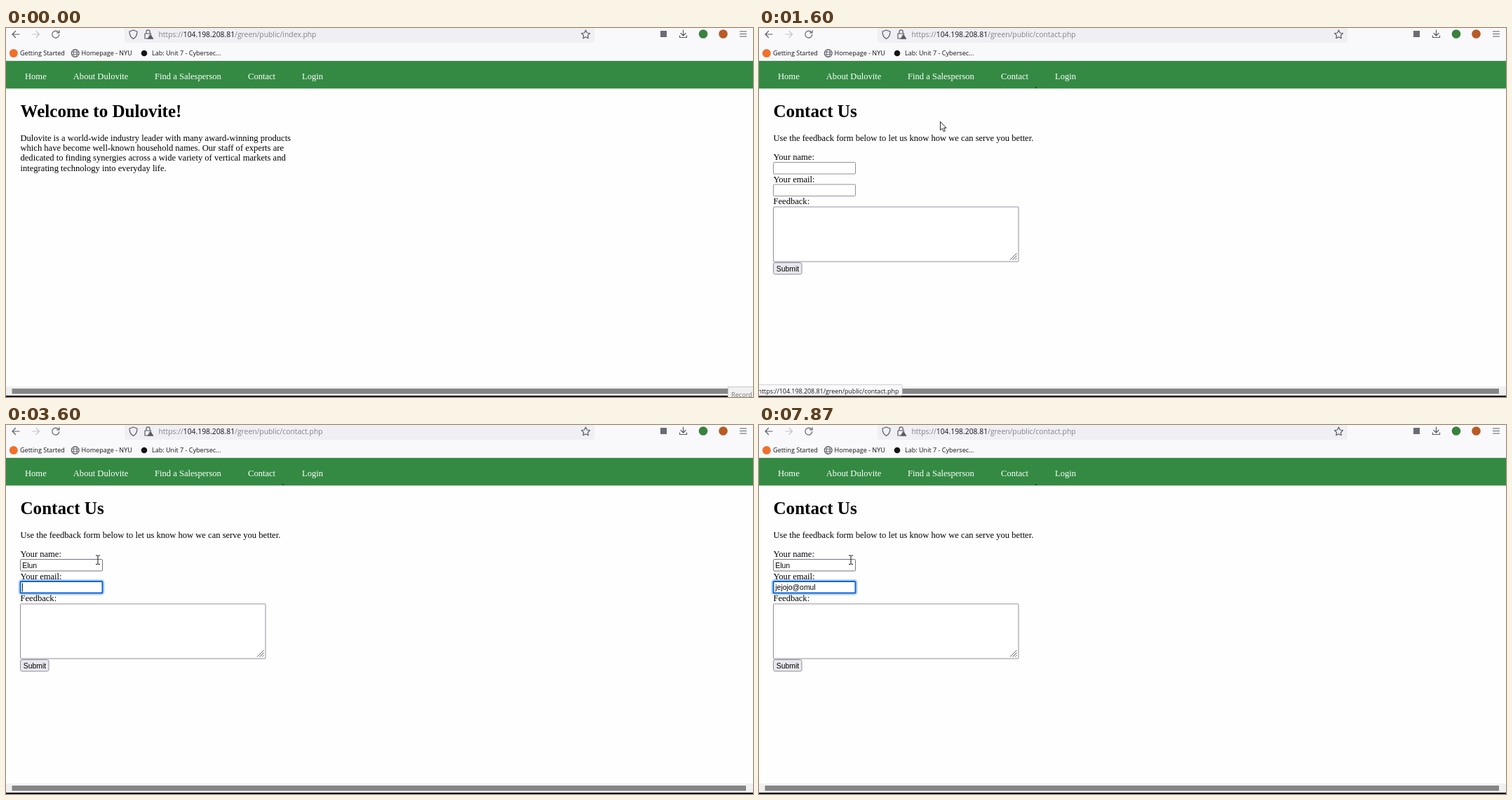
Recreate the animation shown at these times as an HTML page. Size 1065 px wide and 526 px high, loop 8000 ms.

```html
<!DOCTYPE html>
<html lang="en">
<head>
<meta charset="utf-8">
<title>Contact form</title>
<style>
html, body { margin: 0; width: 100%; height: 100%; overflow: hidden; background: #fff; }
svg { display: block; width: 1065px; height: 526px; }
text { white-space: pre; }
.ui { font-family: "Open Sans", "Noto Sans", sans-serif; fill: #15141a; }
.url { font-size: 10.35px; fill: #82828b; }
.url .host { fill: #15141a; }
.small { font-size: 9.05px; }
.page { font: 12.57px "Liberation Serif", serif; }
.page .title { font-size: 25.1px; font-weight: bold; }
.nav { fill: #fff; }
.field { font: 10.4px "Liberation Sans", sans-serif; }
.icon { fill: none; stroke: #5b5b66; stroke-width: 1.2; stroke-linecap: round; stroke-linejoin: round; }
.box { fill: #fff; stroke: #8f8f9d; }
</style>
</head>
<body>
<svg viewBox="0 0 1065 526">
  <rect width="1065" height="526" fill="#fefefe"/>
  <rect width="1065" height="47" fill="#f9f9fb"/>
  <rect y="46" width="1065" height="1" fill="#e6e6ea"/>
  <rect x="169" y="-6" width="670" height="27" rx="4" fill="#f0f0f4"/>

  <g class="icon">
    <path d="M19 9H9M13.5 4.5L9 9L13.5 13.5"/>
    <path d="M37.500 9H47.500M43 4.500L47.500 9L43 13.500" stroke="#c4c4ca"/>
    <path d="M74.600 5.800A5 5 0 1 0 75.800 9.500M76 3.500V7H72.500"/>
    <path d="M181.500 3L187 5C187 10.500 185 13.500 181.500 15.500C178 13.500 176 10.500 176 5Z"/>
    <path d="M202 15H198V8H207M200 8V5.500A2.600 2.600 0 0 1 205.200 5.500V8"/>
    <path d="M206 9L210 15.500H202Z" fill="#5b5b66" stroke-width=".7"/>
    <path d="M826.500 3L828.400 7L832.500 7.500L829.500 10.500L830.200 14.700L826.500 12.700L822.800 14.700L823.500 10.500L820.500 7.500L824.600 7Z"/>
    <path d="M965.500 3V10.500M962 7.500L965.500 11L969 7.500M960.500 11V13.500H970.500V11"/>
    <path d="M1046.500 5H1055.500M1046.500 8.500H1055.500M1046.500 12H1055.500"/>
    <circle cx="98.700" cy="36" r="5.400"/>
    <ellipse cx="98.700" cy="36" rx="2.500" ry="5.400" stroke-width=".9"/>
    <path d="M93.500 34.300H104M93.500 37.700H104" stroke-width=".9"/>
  </g>
  <rect x="933" y="4" width="9" height="9" fill="#6b6b75"/>
  <circle cx="994" cy="8.500" r="6.300" fill="#39813d"/>
  <circle cx="1022.500" cy="8.500" r="6.300" fill="#b85b25"/>
  <circle cx="10.800" cy="36" r="6" fill="#f0702c"/>
  <circle cx="197" cy="36" r="4.300" fill="#151515"/>

  <text class="ui url" x="217.500" y="13.300">https://<tspan class="host">104.198.208.81</tspan><tspan id="path"></tspan></text>
  <g class="ui small">
    <text x="20" y="39.200">Getting Started</text>
    <text x="107.500" y="39.200">Homepage - NYU</text>
    <text x="208" y="39.200">Lab: Unit 7 - Cybersec...</text>
  </g>

  <rect y="47" width="1065" height="39" fill="#348a43"/>
  <rect y="86" width="1065" height=".6" fill="#9bc4a2"/>
  <g class="page nav">
    <text x="27" y="72.500">Home</text>
    <text x="95.800" y="72.500">About Dulovite</text>
    <text x="212" y="72.500">Find a Salesperson</text>
    <text x="345" y="72.500">Contact</text>
    <text x="422" y="72.500">Login</text>
  </g>
  <path id="speck" d="M393.500 84.500H395V85.500H396.500" fill="none" stroke="#1d3b22"/>

  <g id="home" class="page">
    <text class="title" x="20.500" y="127">Welcome to Dulovite!</text>
    <text x="20.500" y="161">Dulovite is a world-wide industry leader with many award-winning products</text>
    <text x="20.500" y="175.200">which have become well-known household names. Our staff of experts are</text>
    <text x="20.500" y="189.400">dedicated to finding synergies across a wide variety of vertical markets and</text>
    <text x="20.500" y="203.600">integrating technology into everyday life.</text>
  </g>

  <g id="contact">
    <g class="page">
      <text class="title" x="20.500" y="127">Contact Us</text>
      <text x="20.500" y="161">Use the feedback form below to let us know how we can serve you better.</text>
      <text x="20.500" y="188">Your name:</text>
      <text x="20.500" y="219.500">Your email:</text>
      <text x="20.500" y="251">Feedback:</text>
    </g>
    <rect id="nameBox" class="box" x="20.500" y="191.500" width="117" height="16.500" rx="1"/>
    <rect class="box" x="20.500" y="223" width="117" height="16.500" rx="1"/>
    <rect class="box" x="20.500" y="255" width="349.500" height="78" rx="1"/>
    <path d="M358 330.500L367.500 321M361.500 330.500L367.500 324.500M365 330.500L367.500 328" stroke="#55555c" fill="none"/>
    <rect x="20.500" y="334.500" width="40.500" height="16.500" rx="2.500" fill="#e9e9ed" stroke="#8f8f9d"/>
    <text class="field" x="24.800" y="347">Submit</text>
    <g id="ring" fill="none">
      <rect x="18.500" y="189.500" width="121" height="20.500" rx="3.500" stroke="#b5d3f8" stroke-width="2"/>
      <rect x="20.500" y="191.500" width="117" height="16.500" rx="1.500" fill="#fff" stroke="#0a62d4" stroke-width="2"/>
    </g>
    <text id="nameText" class="field" x="23.300" y="203.700"></text>
    <text id="mailText" class="field" x="23.300" y="235.200"></text>
    <rect id="caret" width="1" height="12" fill="#111"/>
    <g id="hint">
      <rect x="20.500" y="209.500" width="117" height="15" fill="#fff" stroke="#cfcfd8"/>
      <text class="ui small" x="24" y="220.300">Elun</text>
    </g>
  </g>

  <rect y="511" width="1065" height="13" fill="#f0f0f0"/>
  <rect x="8.500" y="514" width="1046.500" height="7.500" fill="#858585"/>
  <rect y="524" width="1065" height="2" fill="#17181b"/>
  <g id="status">
    <rect x="-2" y="508.500" width="206" height="15.500" rx="1" fill="#f9f9fb" stroke="#d0d0d6"/>
    <text class="ui" x="-1.500" y="520.500" font-size="8.900">https://104.198.208.81/green/public/contact.php</text>
  </g>
  <g id="tip">
    <rect x="1029.500" y="511.500" width="40" height="18" fill="#f1f1f1" stroke="#c8c8c8"/>
    <text class="ui" x="1034" y="525.800" font-size="9.200" style="fill:#777">Record</text>
  </g>

  <path id="arrow" d="M.5 .5V12.700L3.300 10.200L5.300 14.700L7.300 13.800L5.400 9.500H9Z" fill="#fff" stroke="#111" stroke-width=".9"/>
  <path id="hand" d="M4.500 1.500Q6 0 7 1.700V7L8 6.500L9.500 7.200L10.700 7L12 8L13.500 8.500V13L12 16V18.500H5V16.500L1 11.500Q.5 9.500 2.500 10L4.300 11.800V1.500M7 7V10M9.500 7.200V10.300M12 8V10.800" fill="#fff" stroke="#111"/>
  <path id="beam" d="M-3 -6H-.7L0 -5.300L.7 -6H3M0 -5.300V5.700M-3 6.500H-.7L0 5.700L.7 6.500H3" fill="none" stroke="#111"/>
</svg>
<script>
const LOOP = 8000;
const el = Object.fromEntries([...document.querySelectorAll("[id]")].map(e => [e.id, e]));
const show = (e, on) => { e.style.display = on ? "" : "none"; };
const within = (t, from, to) => t >= from && t < to;
const put = (e, x, y) => e.setAttribute("transform", `translate(${x} ${y})`);
const setText = (e, value) => { if (e.textContent !== value) e.textContent = value; };
const latest = (list, t) => list.reduce((found, item) => t >= item[0] ? item : found, [0, ""])[1];

// Pointer stops: time, x, y, shape.
const pointer = [
  [220, 930, 487, "arrow"], [290, 745, 365, "arrow"], [360, 566, 246, "arrow"],
  [670, 540, 215, "arrow"], [740, 505, 180, "arrow"], [810, 470, 148, "arrow"],
  [880, 440, 122, "arrow"], [950, 415, 100, "arrow"], [1020, 396, 84, "arrow"],
  [1090, 389, 72, "arrow"], [1160, 373, 71, "hand"], [1230, 370, 71, "hand"],
  [1520, 322, 97, "arrow"], [1600, 258, 133, "arrow"], [1670, 212, 157, "arrow"],
  [1740, 176, 173, "arrow"], [1810, 151, 181, "arrow"], [1880, 138, 186, "arrow"],
  [1950, 133, 192, "beam"], [2030, 132, 192, "beam"], [2100, 131, 192, "beam"]
];
const nameKeys = [[2890, "E"], [3110, "El"], [3240, "Elu"], [3400, "Elun"]];
const mailKeys = [
  [4960, "j"], [5120, "je"], [5190, "jej"], [5250, "jejo"], [5320, "jejoj"],
  [5760, "jejojo"], [6240, "jejojoj"], [6820, "jejojo"], [7230, "jejojo@"],
  [7590, "jejojo@o"], [7660, "jejojo@om"], [7810, "jejojo@omu"], [7870, "jejojo@omul"]
];

function drawPointer(t) {
  const now = pointer.filter(p => t >= p[0]).pop();
  for (const shape of ["arrow", "hand", "beam"]) show(el[shape], now && now[3] === shape);
  if (now) put(el[now[3]], now[1], now[2]);
}

function drawForm(t) {
  const onMail = t >= 3600;
  const input = onMail ? el.mailText : el.nameText;
  setText(el.nameText, latest(nameKeys, t));
  setText(el.mailText, latest(mailKeys, t));
  el.nameBox.style.stroke = within(t, 1950, 3600) ? "#55555f" : t >= 3600 ? "#73737d" : "";
  show(el.ring, t >= 2160);
  put(el.ring, 0, onMail ? 31.5 : 0);
  const blink = within(t, 2660, 2890) || within(t, 4190, 4690) || t >= 7870;
  show(el.caret, t >= 2160 && !blink);
  const width = input.textContent ? input.getComputedTextLength() : 0;
  put(el.caret, Math.round(23.3 + width), onMail ? 225.5 : 194);
  show(el.hint, within(t, 2960, 3600));
}

function draw() {
  const t = performance.now() % LOOP;
  const loaded = t >= 1450;
  setText(el.path, `/green/public/${loaded ? "contact" : "index"}.php`);
  show(el.home, !loaded);
  show(el.contact, loaded);
  show(el.tip, t < 70);
  show(el.speck, t >= 1090);
  show(el.status, within(t, 1390, 1740));
  drawPointer(t);
  if (loaded) drawForm(t);
  requestAnimationFrame(draw);
}
draw();
</script>
</body>
</html>
```
